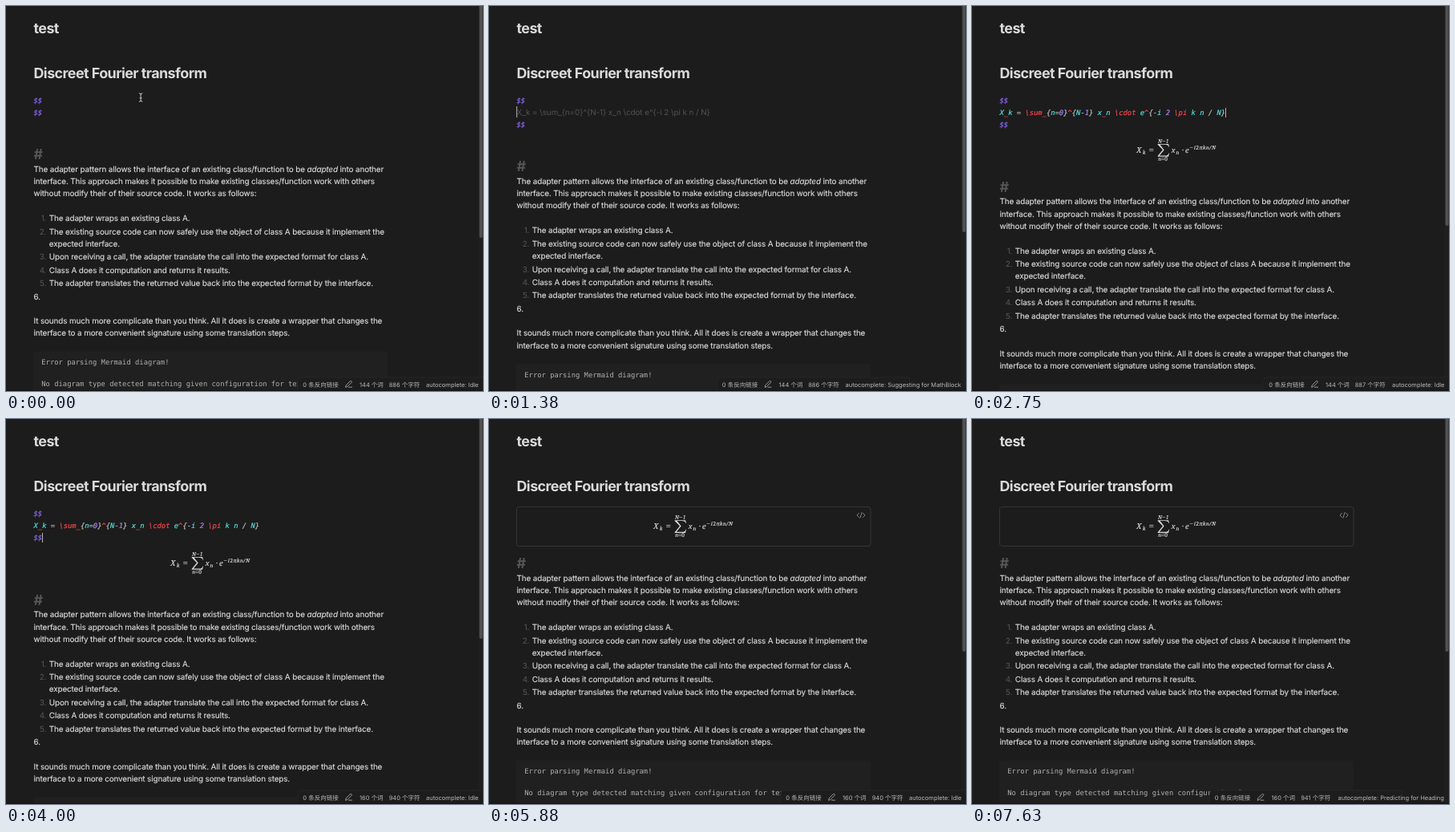
These frames come from a looping animation (595 px wide and 480 px high, 8 s). An HTML page:

```html
<!DOCTYPE html>
<html lang="en">
<head>
<meta charset="utf-8">
<title>Note editor</title>
<style>
  html, body { margin: 0; width: 100%; height: 100%; overflow: hidden; background: #1c1c1c; }
  svg { display: block; width: 595px; height: 480px; }
  text { white-space: pre; text-rendering: geometricPrecision; font-optical-sizing: none; fill: #dadada; }
  .body { font: 9.9px Inter, sans-serif; letter-spacing: -.116px; stroke: #dadada; stroke-width: .15px; }
  .head { font: 700 17.9px Inter, sans-serif; letter-spacing: -.56px; }
  .mono { font: 8.82px "DejaVu Sans Mono", monospace; }
  .code { font: italic 8.82px "DejaVu Sans Mono", monospace; stroke-width: .2px; }
  .stat { font: 7.5px Inter, "Noto Sans CJK SC", "Noto Sans CJK", sans-serif; fill: #b8b8b8; }
  .math { font: italic 10.6px "Liberation Serif", serif; stroke: #dadada; stroke-width: .15px; }
  .scr { font: italic 7.4px "Liberation Serif", serif; stroke: #dadada; stroke-width: .2px; }
  .up { font-style: normal; }
  .dim { fill: #565656; stroke: none; }
  .ghost { fill: #525252; stroke: none; letter-spacing: -.06px; }
  .mark { fill: #8666ea; stroke: #8666ea; }
  .soft { fill: #b0b0b0; }
</style>
</head>
<body>
<svg id="stage" viewBox="0 0 595 480"></svg>
<script>
const LOOP = 8000;
const stage = document.getElementById('stage');

function add(parent, tag, attrs = {}, content = '') {
  const el = document.createElementNS('http://www.w3.org/2000/svg', tag);
  for (const k in attrs) el.setAttribute(k, attrs[k]);
  el.textContent = content;
  parent.appendChild(el);
  return el;
}
const group = (parent = stage) => add(parent, 'g');
const text = (parent, x, y, cls, content) => add(parent, 'text', { x, y, class: cls }, content);
const span = (parent, attrs, content) => add(parent, 'tspan', attrs, content);
const line = (parent, d, stroke, width) =>
  add(parent, 'path', { d, stroke, fill: 'none', 'stroke-width': width, 'stroke-linecap': 'round', 'stroke-linejoin': 'round' });
const show = (el, on) => el.setAttribute('display', on ? 'inline' : 'none');
const shift = (el, x, y) => el.setAttribute('transform', `translate(${x} ${y})`);

const FORMULA = 'X_k = \\sum_{n=0}^{N-1} x_n \\cdot e^{-i 2 \\pi k n / N}';

// Headings
text(stage, 34.5, 34, 'head', 'test');
text(stage, 34.5, 90, 'head', 'Discreet Fourier transform');

// Everything below the math block moves together
const page = group();
add(page, 'rect', { x: 34, y: 430.8, width: 442, height: 110, rx: 2, fill: '#202020' });
text(page, 34.5, 191.3, 'head dim', '#');
const intro = text(page, 34.5, 206.8, 'body', 'The adapter pattern allows the interface of an existing class/function to be ');
span(intro, { 'font-style': 'italic' }, 'adapted');
span(intro, {}, ' into another');
text(page, 34.5, 222, 'body', 'interface. This approach makes it possible to make existing classes/function work with others');
text(page, 34.5, 237.2, 'body', 'without modify their of their source code. It works as follows:');
[
  [268.2, '1.', 'The adapter wraps an existing class A.'],
  [284.6, '2.', 'The existing source code can now safely use the object of class A because it implement the'],
  [299.8, '', 'expected interface.'],
  [316.4, '3.', 'Upon receiving a call, the adapter translate the call into the expected format for class A.'],
  [332.8, '4.', 'Class A does it computation and returns it results.'],
  [349.3, '5.', 'The adapter translates the returned value back into the expected format by the interface.']
].forEach(([y, num, words]) => {
  text(page, 50.3, y, 'body dim', num).setAttribute('text-anchor', 'end');
  text(page, 53.8, y, 'body', words);
});
text(page, 34.5, 365.5, 'body', '6.');
text(page, 34.5, 396.2, 'body', 'It sounds much more complicate than you think. All it does is create a wrapper that changes the');
text(page, 34.5, 411.4, 'body', 'interface to a more convenient signature using some translation steps.');
text(page, 44.3, 447.4, 'mono soft', 'Error parsing Mermaid diagram!');
text(page, 44.3, 473.8, 'mono soft', 'No diagram type detected matching given configuration for text:');

// Math block source
const source = group();
text(source, 34.5, 120.7, 'code mark', '$$');
const closing = text(source, 34.5, 136, 'code mark', '$$');
const ghost = text(source, 34.5, 136, 'body ghost', FORMULA);
const typed = text(source, 34.5, 135.8, 'code', '');
const tokenColor = s =>
  /^(\\|[_^])/.test(s) ? '#fb464c' : /^[a-z]/i.test(s) ? '#53dfdd' : /^\d/.test(s) ? '#a882ff' : '#c0c0c0';
FORMULA.match(/\\[a-z]+|[a-z]+|\d+|\s+|./gi).forEach(s => {
  const color = tokenColor(s);
  span(typed, { style: `fill:${color};stroke:${color}` }, s);
});

// Rendered formula, baseline at y = 0
const frame = group();
add(frame, 'rect', { x: 34.5, y: 109.5, width: 441.5, height: 49, rx: 3, fill: 'none', stroke: '#353535' });
line(frame, 'M461.5 117.3l-2.6 2.6 2.6 2.6M466.5 117.3l2.6 2.6-2.6 2.6M465 116.6l-2 6.6', '#a0a0a0', .8);
const formula = group();
text(formula, 205, 0, 'math', 'X');
text(formula, 213, 1.8, 'scr', 'k');
text(formula, 220.8, 0, 'math up', '=');
add(formula, 'path', {
  d: 'M231.6-10.8H245l1.2 3.8h-.6c-.8-2.3-2.2-3-5.2-3h-5.9l5.2 6.6-5.9 7.2h6.4c3.2 0 4.6-.8 5.4-3.1h.6L245 5H231.6v-.7l6.4-7.8-6.4-6.6z',
  fill: '#dadada'
});
text(formula, 231.9, -12.2, 'scr', 'N−1');
const lower = text(formula, 232.3, 10.4, 'scr', 'n');
span(lower, { class: 'up' }, '=0');
text(formula, 248.8, 0, 'math', 'x');
text(formula, 254.4, 1.8, 'scr', 'n');
text(formula, 261.2, 0, 'math up', '·');
text(formula, 266, 0, 'math', 'e');
const power = text(formula, 271, -4, 'scr', '−i');
power.style.letterSpacing = '.65px';
span(power, { class: 'up' }, '2');
span(power, {}, 'πkn/N');

const caret = add(stage, 'rect', { width: 1, fill: '#b4b4b4' });
const pointer = line(stage, 'M166.3 108.8q1.8 0 1.8 1.3v7.8q0 1.3-1.8 1.3M169.9 108.8q-1.8 0-1.8 1.3M168.1 117.9q0 1.3 1.8 1.3M167 114.8h2.2', '#d8d8d8', .9);

// Scrollbar and window edge
add(stage, 'rect', { x: 589, y: 0, width: 6, height: 480, fill: '#1f1f1f' });
const thumb = add(stage, 'rect', { x: 590.5, y: -6, width: 4, rx: 2, fill: '#525252' });

// Status bar, laid out from the left end of the last item
const bar = group();
add(bar, 'path', { d: 'M-160 480V467q0-4 4-4H80V480z', fill: '#1d1d1d', stroke: '#292929', 'stroke-width': .7 });
text(bar, -153.7, 474.6, 'stat', '0 条反向链接');
line(bar, 'M-100.3 475l.6-2.3 5-5q.8-.6 1.6.1t.1 1.6l-5 5zM-96.5 475.2h4', '#b8b8b8', .8);
const words = text(bar, -83, 474.6, 'stat', '');
const chars = text(bar, -46.3, 474.6, 'stat', '');
const task = text(bar, 0, 474.6, 'stat', '');
add(stage, 'rect', { x: 0, y: 478.8, width: 595, height: 1.2, fill: '#131216' });

// Each track lists [start, ...values]; the last started entry holds
const LAYOUT = [[0, 0, 289], [1380, 15.2, 282], [2750, 40.6, 274], [4130, -5, 290]];
const TASK = [
  [0, 'Idle', 524], [1380, 'Suggesting for MathBlock', 444.5], [2750, 'Idle', 524],
  [6130, 'Queued for Heading', 464], [6630, 'Predicting for Heading', 456.5]
];
const COUNT = [[0, 144, 886], [1630, 144, 887], [3000, 160, 940], [6380, 160, 941]];
const CARET = [
  [0], [130, 45, 111, 13], [500], [1000, 45, 111, 13],
  [1380, 34.2, 125, 14], [1880], [2500, 34.2, 125, 14],
  [2750, 316, 127, 12], [3250], [3750, 316, 127, 12],
  [4000, 45, 142, 12], [4130, 34, 169, 21], [4380, 318.5, 192, 12], [4880],
  [5380, 45.5, 168, 22], [5880], [6130, 49, 168, 22], [6630], [7130, 49, 168, 22], [7630]
];
const at = (track, t) => track.filter(e => e[0] <= t).pop().slice(1);

function draw(t) {
  const [dy, thumbEnd] = at(LAYOUT, t);
  const typing = t >= 1380, accepted = t >= 2750, rendered = t >= 4130;
  shift(page, 0, dy);
  thumb.setAttribute('height', thumbEnd + 6);
  show(source, !rendered);
  show(ghost, typing && !accepted);
  show(typed, accepted);
  closing.setAttribute('y', typing ? 151 : 136);
  show(frame, rendered);
  show(formula, accepted);
  shift(formula, 0, rendered ? 137 : 182.8);
  show(pointer, !typing);

  const [x, y, height] = at(CARET, t);
  show(caret, height);
  if (height) {
    caret.setAttribute('x', x);
    caret.setAttribute('y', y);
    caret.setAttribute('height', height);
  }

  const [state, left] = at(TASK, t);
  const [wordCount, charCount] = at(COUNT, t);
  shift(bar, left, 0);
  task.textContent = 'autocomplete: ' + state;
  words.textContent = wordCount + ' 个词';
  chars.textContent = charCount + ' 个字符';
}

const start = performance.now();
function tick() {
  draw((performance.now() - start) % LOOP);
  requestAnimationFrame(tick);
}
tick();
</script>
</body>
</html>
```
